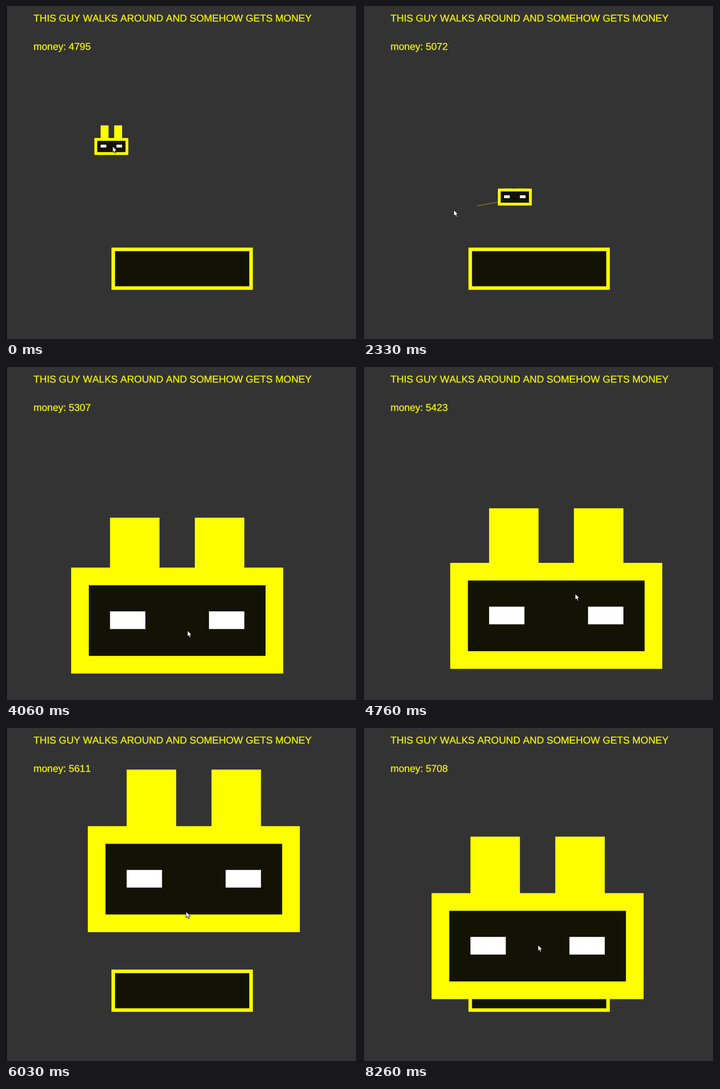
An HTML page that plays this animation: 768x729 px, repeating every 8.53 s.

```html
<!DOCTYPE html>
<html lang="en">
<head>
<meta charset="utf-8">
<title>Walking guy</title>
<style>
  html, body { margin: 0; width: 100%; height: 100%; overflow: hidden; background: #333; }
  svg { display: block; width: 768px; height: 729px; }
  text {
    font: 21.65px "Liberation Sans", Arial, sans-serif;
    font-kerning: none;
    text-rendering: geometricPrecision;
    fill: #ebeb00;
    stroke: #ebeb00;
    stroke-width: .5px;
  }
</style>
</head>
<body>
<svg viewBox="0 0 768 729">
  <rect width="768" height="729" fill="#333"/>
  <rect width="1.6" height="729" fill="#080808"/>
  <rect x="766.6" width="1.4" height="729" fill="#080808"/>
  <line id="leash" stroke="#ff0" stroke-opacity=".26" stroke-width="2.3"/>
  <rect x="234.6" y="532.7" width="301.6" height="84.8" fill="#131305" stroke="#ff0" stroke-width="7.73"/>
  <text x="60.3" y="34">THIS GUY WALKS AROUND AND SOMEHOW GETS MONEY</text>
  <text id="money" x="60.3" y="95.9"></text>
  <g id="guy">
    <rect class="ear" x="11" width="14" fill="#ff0"/>
    <rect class="ear" x="35" width="14" fill="#ff0"/>
    <rect width="60" height="30" fill="#ff0"/>
    <rect x="5" y="5" width="50" height="20" fill="#131305"/>
    <g id="eyes" fill="#fff">
      <rect x="11" y="12.5" width="10" height="5"/>
      <rect x="39" y="12.5" width="10" height="5"/>
    </g>
  </g>
  <path id="cursor" d="M0 0V13.4L3 10.6L5.1 15.6L7.4 14.6L5.3 9.8H9.4Z"
        fill="#fff" stroke="#000" stroke-width="1"/>
</svg>
<script>
const LOOP = 8530;
const LAG = 320;            // time constant of the guy chasing the pointer
const LEASH_DELAY = 100;
const GROW_AT = 3490;       // he touches the box
const WALK_END = 6780;
const PX = 1.5466;
const EYE_LIFT = 0.8;
const OFFSET = [-1, 2.7];   // where he rests, relative to the pointer
const FIRST_GAP = [1.5, 2.2];

// Corners of the pointer's walk: time, x, y
const corners = [
  [0, 233, 307], [860, 421, 300], [1150, 362.6, 297.8], [1400, 524, 346],
  [1500, 527, 349], [1730, 505, 393], [2450, 138, 457], [2750, 267, 417],
  [3060, 326, 526], [3160, 335, 529], [3460, 380, 563], [3760, 371.3, 539.6],
  [4060, 397, 577], [4500, 415, 562], [4850, 481, 474], [5200, 455, 203],
  [5300, 437, 205], [5600, 418, 260], [6200, 384.4, 457.7], [6660, 383, 475],
  [LOOP, 383, 475]
];
const wallet = [[0, 4795], [1500, 4940], [3160, 5204], [4060, 5307],
  [5300, 5513], [6660, 5695], [WALK_END, 5708], [LOOP, 5708]];

const $ = id => document.getElementById(id);
const ears = document.querySelectorAll(".ear");

function set(el, attrs) {
  for (const k in attrs) el.setAttribute(k, attrs[k]);
}

function linear(keys, t, c) {
  const i = Math.max(1, keys.findIndex(k => k[0] > t));
  const a = keys[i - 1], b = keys[i];
  return a[c] + (b[c] - a[c]) * Math.max(0, t - a[0]) / (b[0] - a[0]);
}

const pointer = t => [linear(corners, t, 1), linear(corners, t, 2)];

// Exact exponential chase: on a straight stretch the gap tends to speed * LAG.
function centre(t) {
  const goal = pointer(t);
  return goal.map((p, axis) => {
    let gap = FIRST_GAP[axis];
    for (let i = 1; i < corners.length && corners[i - 1][0] < t; i++) {
      const a = corners[i - 1], b = corners[i];
      const steady = LAG * (b[axis + 1] - a[axis + 1]) / (b[0] - a[0]);
      const time = Math.min(t, b[0]) - a[0];
      gap = steady + (gap - steady) * Math.exp(-time / LAG);
    }
    return p + OFFSET[axis] - gap;
  });
}

const wiggle = t => t < WALK_END ? 20 * Math.sin(Math.PI * (0.34 + t * 0.01003)) - 10 : 0;

function draw(t) {
  const [x, y] = centre(t), [px, py] = pointer(t), [lx, ly] = pointer(t - LEASH_DELAY);
  const unit = PX * (t < GROW_AT ? 0.8 : 5);
  const ear = Math.max(0, 16 + wiggle(t) / unit);
  set($("guy"), { transform: `translate(${x - 30 * unit} ${y - 15 * unit}) scale(${unit})` });
  set($("eyes"), { transform: `translate(0 ${-EYE_LIFT / unit})` });
  ears.forEach(e => set(e, { y: -ear, height: ear + 1 }));
  set($("leash"), { x1: x, y1: y + 4, x2: lx, y2: ly });
  set($("cursor"), { transform: `translate(${px} ${py})` });
  $("money").textContent = "money: " + Math.round(linear(wallet, t, 1));
}

const start = performance.now();
function tick() {
  draw((performance.now() - start) % LOOP);
  requestAnimationFrame(tick);
}
tick();
</script>
</body>
</html>
```
